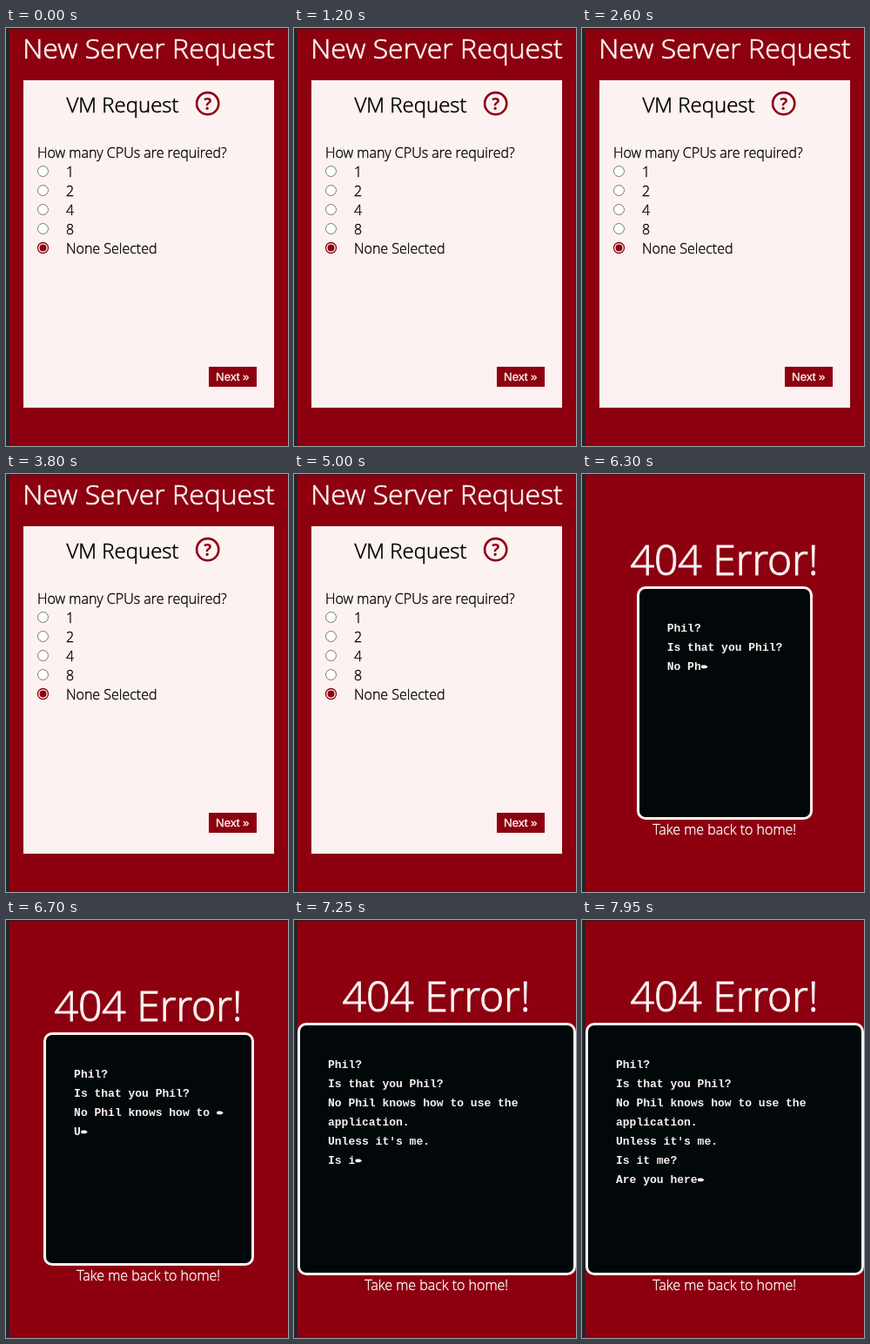
Write an HTML page that moves like this. It is 324 px wide and 480 px high and loops after 8000 ms.

```html
<!DOCTYPE html>
<html lang="en">
<head>
<meta charset="utf-8">
<title>New Server Request</title>
<style>
  html, body { margin: 0; width: 100%; height: 100%; overflow: hidden; background: #8c0010; }
  svg { display: block; width: 324px; height: 480px; }
  text {
    font: 300 16px "Open Sans", sans-serif; white-space: pre;
    fill: #000; stroke: #000; stroke-width: .022em;
  }
  .light { fill: #fcf2f1; stroke: #fcf2f1; }
  .mid { text-anchor: middle; }
  .help { font-size: 19px; font-weight: 700; fill: #8c0010; stroke: none; }
  .button { font: 13.333px "Liberation Sans", Arial, sans-serif; fill: #fff; stroke: #fff; }
  #link { fill: #fff; stroke: #fff; }
  #rows text { font: bold 13px "Liberation Mono", monospace; fill: #fcf2f1; stroke: none; }
  .radio { fill: #fff; stroke: #767676; }
</style>
</head>
<body>
<svg viewBox="0 0 324 480">
  <rect width="324" height="480" fill="#8c0010"/>
  <rect width="4" height="480" fill="#23252b"/>
  <rect width="324" height="1" fill="#40131c"/>

  <g id="form">
    <text class="light mid" x="164" y="35" style="font-size:32px">New Server Request</text>
    <rect x="20" y="60" width="288" height="376" fill="#fcf2f1"/>
    <text x="69.5" y="97" style="font-size:24px">VM Request</text>
    <circle cx="231.7" cy="86.7" r="12.6" fill="none" stroke="#8c0010" stroke-width="2.6"/>
    <text class="help mid" x="231.7" y="93.5">?</text>
    <text x="36" y="149">How many CPUs are required?</text>
    <g id="options"></g>
    <rect x="233" y="389" width="55" height="23" fill="#8c0010"/>
    <text class="button" x="241" y="405">Next »</text>
  </g>

  <g id="error">
    <text id="heading" class="light mid" x="163.5" style="font-size:48px">404 Error!</text>
    <rect id="box" rx="8.5" fill="#02080a" stroke="#fcf2f1" stroke-width="3"/>
    <g id="rows"></g>
    <text id="link" class="mid" x="163.7">Take me back to home!</text>
  </g>
</svg>
<script>
const $ = id => document.getElementById(id);

const LOOP = 8000, STEP = 50, SWITCH = 5100, CHAR_MS = 24.5;
const CENTER_X = 164, CENTER_Y = 263, FULL_WIDTH = 320;
const PAD = 35, ROW = 22, CHAR = 7.8, CURSOR = 8, PARAGRAPHS = 9;

const lines = [
  [5150, "Phil?"],
  [5650, "Is that you Phil?"],
  [6162, "No Phil knows how to use the application."],
  [6660, "Unless it's me."],
  [7150, "Is it me?"],
  [7650, "Are you here?"]
];

$("options").innerHTML = ["1", "2", "4", "8", "None Selected"].map((label, i) => {
  const y = 164.5 + 22 * i;
  const mark = i < 4
    ? `<circle class="radio" cx="42.5" cy="${y}" r="6"/>`
    : `<circle cx="42.5" cy="${y}" r="6" fill="#fff" stroke="#8c0010" stroke-width="1.3"/>
       <circle cx="42.5" cy="${y}" r="4" fill="#8c0010"/>`;
  return mark + `<text x="69" y="${y + 6.5}">${label}</text>`;
}).join("");

// Typed part of a line, broken at the last space when it outgrows the box
function typedRows(start, text, time) {
  const count = Math.max(0, Math.floor((time - start) / CHAR_MS));
  const typed = text.slice(0, count);
  const typing = count > 0 && count < text.length;
  const width = typed.length * CHAR + (typing ? CURSOR : 0);
  if (width <= FULL_WIDTH - 2 * PAD) return [{ typed, typing, width }];
  const cut = typed.lastIndexOf(" ");
  return [
    { typed: typed.slice(0, cut), typing: false, width: FULL_WIDTH - 2 * PAD },
    { typed: typed.slice(cut + 1), typing, width: 0 }
  ];
}

function drawTerminal(time) {
  const rows = lines.flatMap(([start, text]) => typedRows(start, text, time));
  const rowCount = PARAGRAPHS + rows.length - lines.length;
  const width = Math.max(...rows.map(r => r.width)) + 2 * PAD;
  const height = rowCount * ROW + 2 * PAD;
  const left = CENTER_X - width / 2, top = CENTER_Y - height / 2;

  // The border sits on whole pixels, the text does not
  const edge = Math.round(left), boxWidth = Math.round(left + width) - edge;
  const box = { x: edge + 1.5, y: top + 1.5, width: boxWidth - 3, height: height - 3 };
  for (const key in box) $("box").setAttribute(key, box[key]);
  $("heading").setAttribute("y", top - 13.5);
  $("link").setAttribute("y", top + height + 17);

  $("rows").innerHTML = rows.map(({ typed, typing }, i) => {
    const x = left + PAD, y = top + 52 + ROW * i;
    const pencil = `<path transform="translate(${x + typed.length * CHAR} ${y})"
      d="M1.6-5.4H5.4L8-3.6 5.4-1.8H1.6Q.2-1.8.2-3.6T1.6-5.4Z" fill="#fcf2f1"/>`;
    return `<text x="${x}" y="${y}">${typed}</text>` + (typing ? pencil : "");
  }).join("");
}

const origin = performance.now();
function frame() {
  const elapsed = (performance.now() - origin) % LOOP;
  const time = Math.floor(elapsed / STEP) * STEP;
  const failed = time >= SWITCH;
  $("form").style.display = failed ? "none" : "";
  $("error").style.display = failed ? "" : "none";
  if (failed) drawTerminal(time);
  requestAnimationFrame(frame);
}
frame();
</script>
</body>
</html>
```
